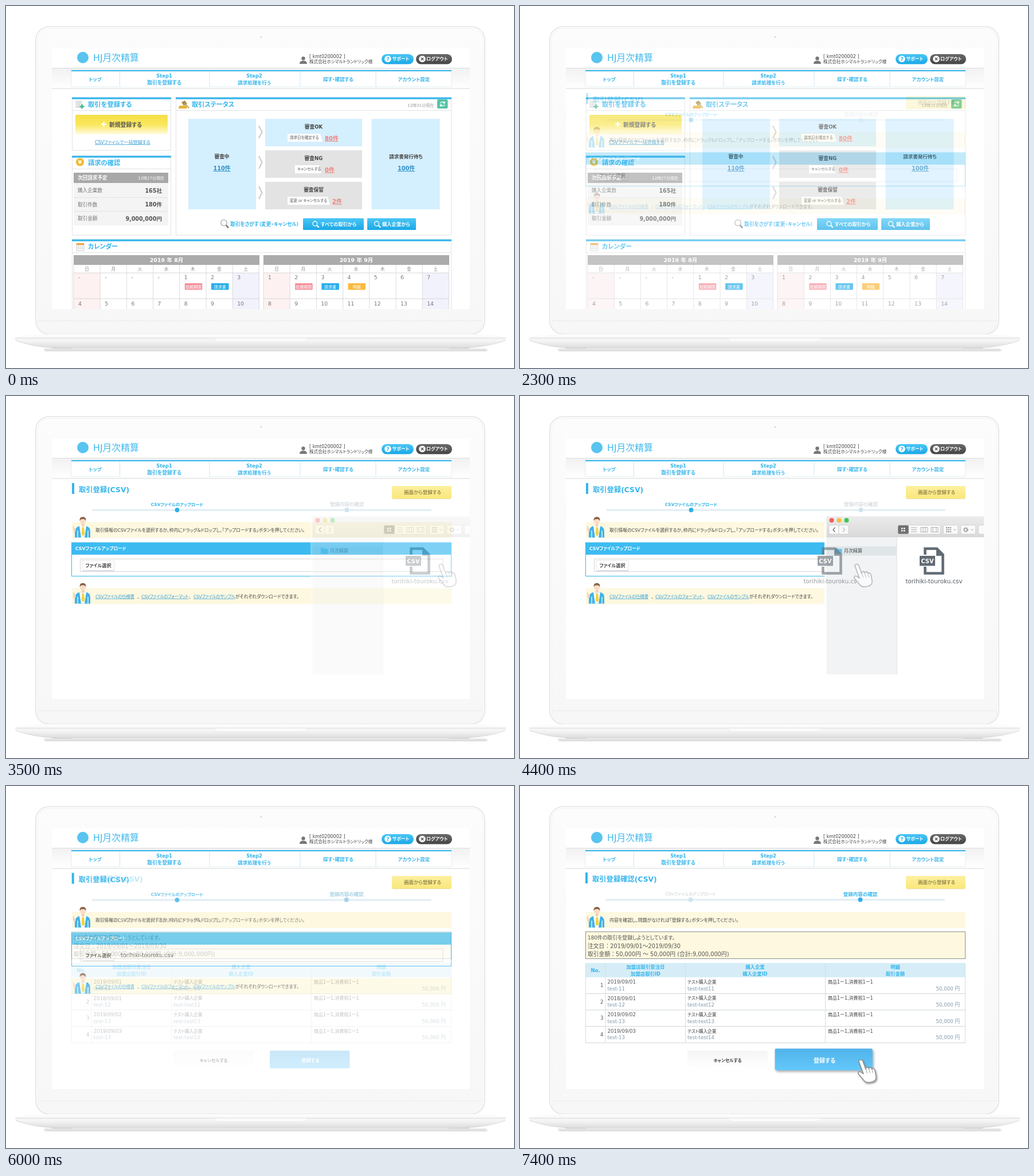
Write an HTML page that moves like this. It is 886 by 632 pixels and loops after 8000 ms.

```html
<!DOCTYPE html>
<html lang="ja">
<head>
<meta charset="utf-8">
<title>取引登録</title>
<style>
html, body { margin: 0; width: 100%; height: 100%; overflow: hidden; background: #fff; }
svg { display: block; width: 886px; height: 632px; }
text { font-family: "DejaVu Sans", "Noto Sans CJK JP", "Noto Sans CJK", sans-serif; font-feature-settings: "palt"; white-space: pre; }
.wide { font-feature-settings: normal; }
</style>
</head>
<body>
<svg id="stage" viewBox="0 0 886 632" xmlns="http://www.w3.org/2000/svg"></svg>
<script>
const BLUE = '#35b5ec', INK = '#444', LINE = '#e2e2e2', PALE = '#d4effe';

// Markup helpers. Text is centred vertically on y.
const attrs = o => Object.entries(o).map(([k, v]) => ` ${k}="${v}"`).join('');
const rect = (x, y, x2, y2, fill, o = {}) =>
  `<rect x="${x}" y="${y}" width="${x2 - x}" height="${y2 - y}" fill="${fill}"${attrs(o)}/>`;
const circle = (x, y, r, fill, o = {}) => `<circle cx="${x}" cy="${y}" r="${r}" fill="${fill}"${attrs(o)}/>`;
const path = (d, fill, o = {}) => `<path d="${d}" fill="${fill}"${attrs(o)}/>`;
const stroke = (d, color, w = 1, o = {}) => path(d, 'none', { stroke: color, 'stroke-width': w, ...o });
const text = (x, y, s, size, fill = INK, o = {}) =>
  `<text x="${x}" y="${y + size * .36}" font-size="${size}" fill="${fill}"${attrs(o)}>${s}</text>`;
const group = (body, o = {}) => `<g${attrs(o)}>${body}</g>`;
const at = (x, y, body) => group(body, { transform: `translate(${x} ${y})` });
const grad = (id, ...stops) => `<linearGradient id="${id}" x2="0" y2="1">` +
  stops.map((c, i) => `<stop offset="${i / (stops.length - 1)}" stop-color="${c}"/>`).join('') + '</linearGradient>';
const times = (n, f) => Array.from({ length: n }, (_, i) => f(i)).join('');

const B = { 'font-weight': 700 }, MID = { 'text-anchor': 'middle' }, END = { 'text-anchor': 'end' };
const BM = { ...B, ...MID }, BE = { ...B, ...END }, UL = { 'text-decoration': 'underline' };
const SHADOW = { filter: 'url(#shadow)' }, WIDE = { class: 'wide' };

const defs = `<defs>
${grad('lid', '#fcfcfc', '#f7f7f7')}${grad('deck', '#fdfdfd', '#f4f4f4', '#dcdcdc')}
${grad('band', '#f1f1f1', '#fff')}${grad('sky', '#49c6f6', '#1ba8e6')}${grad('coal', '#6a6a6a', '#444')}
${grad('sun', '#f6df45', '#fae75c', '#fffbe0')}${grad('gold', '#fdf0a0', '#fae77c')}
${grad('press', '#51b3ea', '#63c8fb')}${grad('mist', '#f5f5f5', '#fff')}${grad('bar', '#ececec', '#d9d9d9')}
<filter id="shadow" x="-20%" y="-30%" width="140%" height="170%"><feDropShadow dx="1.5" dy="2" stdDeviation="1.6" flood-color="#555" flood-opacity=".55"/></filter>
<clipPath id="screen"><rect x="80" y="74" width="729" height="455"/></clipPath></defs>`;

const hand = (x, y) => at(x, y,
  path('M3 7C0 2 6-1 9 4L14 18C14 14 18 13 19 17C20 14 24 14 25 18C26 15 29 17 30 20L32 30C33 36 30 40 20 41C13 42 11 38 8 34L1 26C0 22 4 21 7 24L10 26Z',
    '#fff', { stroke: '#929292', 'stroke-width': 1.6, 'stroke-linejoin': 'round' }) +
  stroke('M14.5 18l2 7M19.5 17.5l2 7M25 18.5l1.5 6', '#aaa', 1.1));

function laptop() {
  return group(rect(66, 598, 838, 601, '#cfcfcf', { rx: 1.5 }), { filter: 'url(#shadow)', opacity: .55 }) +
    rect(52, 36, 835, 573, '#fff', { rx: 23, stroke: '#e3e3e3', 'stroke-width': 1.6 }) +
    rect(55, 39, 832, 572, 'url(#lid)', { rx: 20, stroke: '#f0f0f0' }) +
    stroke('M55 549.5H832', '#ececec') + circle(445, 54, 1.2, '#ccc') +
    path('M72 594h46l-3 4H82zM770 594h44l-8 4H773z', '#cfcfcf') +
    path('M16 578Q34 574 64 573H824Q854 574 872 578V583Q840 595 800 597H88Q48 595 16 584Z', 'url(#deck)') +
    stroke('M16 580H872M17 584Q50 596 88 597H800Q842 595 871 584', '#d3d3d3', .9) +
    path('M363 580H525Q524 586 514 586H374Q364 586 363 580Z', '#fbfbfb', { stroke: '#e5e5e5', 'stroke-width': .6 }) +
    rect(80, 74, 809, 529, '#fff');
}

const step1 = () => rect(198, 112, 355, 141, '#fff') + rect(198, 112, 355, 114, BLUE) +
  text(276, 122, 'Step1', 8.4, BLUE, BM) + text(276, 134, '取引を登録する', 8.8, BLUE, BM);

function header() {
  const tabs = [[155.5, 128, 'トップ'], [433, 134, '請求処理を行う'], [579.5, 128, '探す・確認する'], [711.5, 128, 'アカウント設定']];
  return circle(134, 90, 10, '#58c4ef') +
    text(152, 90, 'HJ月次精算', 15.8, '#3fb9ec') +
    circle(518.5, 91.5, 3.2, '#777') + path('M512 101Q512 95.5 518.5 95.5T525 101Z', '#777') +
    text(529, 88.5, '[ kmt0200002 ]', 8, INK) +
    text(529, 97, '株式会社ホシマルトランドリック様', 7.6, INK) +
    rect(655, 84, 711, 101.5, 'url(#sky)', { rx: 8.7 }) + circle(666, 92.5, 5.8, '#fff') +
    text(666, 92.5, '?', 9.5, BLUE, BM) + text(673.5, 92.5, 'サポート', 8, '#fff', B) +
    rect(715, 84, 778, 101.5, 'url(#coal)', { rx: 8.7 }) + circle(726, 92.5, 5.8, '#fff') +
    stroke('M723.8 90.3l4.4 4.4m0-4.4l-4.4 4.4', '#555', 1.4) + text(733, 92.5, 'ログアウト', 8, '#fff', B) +
    rect(80, 108, 809, 144, 'url(#band)') + stroke('M80 108.5H809', '#dcdcdc') + stroke('M80 144H809', '#d8d8d8', 1.2) +
    rect(114, 112, 777, 141, '#fff', { stroke: '#d9eaf3', 'stroke-width': .8 }) + step1() +
    rect(114, 112, 777, 114, BLUE) + stroke('M198.5 114V141M355 114V141M513 114V141M645 114V141', '#cfe6f1') +
    text(433, 122, 'Step2', 8.4, BLUE, BM) + tabs.map(([x, y, s]) => text(x, y, s, 8.5, BLUE, BM)).join('');
}

const panel = (x, y, x2, y2, title, tx, o) => rect(x + .5, y, x2 - .5, y2, '#fff', { stroke: LINE }) +
  rect(x, y - .5, x2, y + 2.7, BLUE) + stroke(`M${x} ${y + 22.5}H${x2}`, LINE) +
  text(tx, y + 12, title, 11.3, BLUE, { ...B, ...o });
const lens = (x, y, r, c) => stroke(`M${x + r * .7} ${y + r * .7}l4 4`, c, 2) + circle(x, y, r, 'none', { stroke: c, 'stroke-width': 1.3 });

function month(x, title, first, tags) {
  const w = 46.2, X = i => x + i * w;
  return rect(x, 435, x + 324, 452, '#ababab') + text(x + 162, 444, title, 9.5, '#fff', BM) +
    rect(x, 466, X(1), 529, '#fdf2f1') + rect(X(6), 466, x + 324, 529, '#f2f2fd') +
    times(8, i => stroke(`M${X(i)} 452V529`, '#d9d9d9', .9)) +
    stroke(`M${x} 466H${x + 324}M${x} 511H${x + 324}`, '#d3d3d3', .9) +
    times(7, i => text(X(i) + 23, 459.5, '日月火水木金土'[i], 7.5, '#888', MID) +
      text(X(i) + 8, 474, first + i > 0 ? first + i : '-', 9.3, '#777') +
      text(X(i) + 8, 519.5, first + i + 7, 9.3, '#777')) +
    tags.map(([i, s, c]) => rect(X(i) + 9, 484, X(i) + 39.5, 495.5, c, { rx: 1 }) +
      text(X(i) + 24.2, 490, s, 7, '#fff', MID)).join('');
}

function dashboard() {
  const rows = [['購入企業数', '165社', 322], ['取引件数', '180件', 346.5], ['取引金額', '9,000,000円', 371]];
  const cases = [['審査OK', '請求日を確定する', '80件', 491, 552, 556], ['審査NG', 'キャンセルする', '0件', 504, 550, 556],
    ['審査保留', '変更 or キャンセルする', '2件', 491, 565, 569]];
  return rect(80, 145, 809, 529, '#fff') +
    panel(115, 160, 288, 252, '取引を登録する', 143) +
    rect(122, 166, 132, 177, '#eef2f3', { stroke: '#b8c4c8', 'stroke-width': .8 }) + stroke('M124 169h6m-6 3h6m-6 3h4', '#b5c0c4', .9) +
    stroke('M132.5 171.5v8m-4-4h8', '#3fb78a', 2.3) +
    rect(121, 190, 282, 224, 'url(#sun)', { rx: 2 }) + stroke('M166 206.5h9m-4.5-4.5v9', '#fff', 2.4) +
    text(180, 207, '新規登録する', 9.8, '#555', B) +
    text(155, 237.5, 'CSVファイルで一括登録する', 8.4, '#3a9fd6', { ...UL, 'letter-spacing': -.4 }) +
    panel(115, 262, 288, 400, '請求の確認', 143) +
    circle(129, 272.5, 7, '#f2b82e') + text(129, 272.5, '¥', 9, '#fff', BM) +
    rect(118, 309, 283, 383, '#f4f4f4') + rect(118, 291, 283, 309, '#a8a8a8') +
    text(125, 300, '次回請求予定', 8.6, '#fff', B) + text(276, 300.5, '12時27分現在', 7, '#fff', END) +
    rows.map(([a, b, y]) => text(125, y, a, 8.6, '#777') + text(272, y + .5, b, 9.6, '#555', BE)).join('') +
    stroke('M118 334.5H283M118 358.5H283', '#ccc', .8, { 'stroke-dasharray': '2 1.5' }) +

    panel(296, 160, 777, 400, '取引ステータス', 324, { 'letter-spacing': -.2 }) +
    path('M302 174h12l2 5H301z', '#e6b23a') + path('M306 168l6-3 4 6-6 3z', '#a98a4c') + stroke('M311 170l8 8', '#c9a04a', 2) +
    text(746, 173, '12時31分現在', 7, '#999', END) + rect(752, 163, 770.5, 179, '#55c3a5', { rx: 2.5 }) +
    stroke('M757.5 170a4 4 0 0 1 7-1m.5-2.5v3h-3M765 172a4 4 0 0 1-7 1m-.5 2.5v-3h3', '#fff', 1.4) +
    rect(318, 197, 436, 355, PALE) + rect(637.5, 197, 756.5, 355, PALE) +
    text(376.5, 263, '審査中', 8.7, INK, BM) + text(376.5, 283.5, '110件', 9.8, '#2f8fc8', { ...BM, ...UL }) +
    text(697.5, 263, '請求書発行待ち', 8.5, INK, BM) + text(698, 283.5, '100件', 9.8, '#2f8fc8', { ...BM, ...UL }) +
    cases.map(([name, act, n, x, x2, nx], i) => at(0, i * 55,
      rect(452, 197, 621, 245, i ? '#e3e3e3' : PALE) +
      stroke(`M441 ${209 - i * 2}l5.5 11-5.5 11`, '#cfcfcf', 2.4) +
      text(536.5, 211, name, 8.7, INK, BM) + path(`M${x} 223H${x2 - 4}L${x2} 237H${x}Z`, '#fff') +
      text(x + 4, 230, act, 6.7, '#555', { 'letter-spacing': -.15 }) + text(nx, 231, n, 10, '#f0827c', { ...B, ...UL }))).join('') +
    lens(380, 378.5, 5.2, '#aaa') + stroke('M384 383l4 4.5', '#777', 2.4) +
    text(391, 381, '取引をさがす（変更・キャンセル）', 8.7, BLUE, B) +
    rect(518, 370.5, 624, 391, 'url(#sky)', { rx: 1.5 }) + lens(539, 380, 4, '#fff') + text(549, 381, 'すべての取引から', 8.3, '#fff', B) +
    rect(630, 370.5, 715, 391, 'url(#sky)', { rx: 1.5 }) + lens(646.5, 380, 4, '#fff') + text(656, 381, '購入企業から', 8.3, '#fff', B) +

    panel(115, 408, 777, 540, 'カレンダー', 143, { 'letter-spacing': -.3 }) +
    rect(123, 415, 136, 427, '#fff', { stroke: '#bbb', 'stroke-width': .8 }) + rect(123, 414, 136, 417.5, '#f0a54a') +
    stroke('M125 420.5h9m-9 3h9', '#bbb', 1.4, { 'stroke-dasharray': '2 1.5' }) +
    month(118, '2019 年 8月', -3, [[4, '依頼期限', '#f4919c'], [5, '請求書', '#27aeea']]) +
    month(449, '2019 年 9月', 1, [[1, '依頼期限', '#f4919c'], [2, '請求書', '#27aeea'], [3, '明細', '#f8b93f']]);
}

const guide = y => rect(115, y, 777, y + 28, '#fdf8df') + at(117, y - 9,
  path('M3 36V26Q4 17 12 16H22Q30 17 30 26V36Z', '#3fb2e8') + path('M11 16h12l-3 20H14Z', '#fff') +
  path('M15.5 18h3.5l1.5 12-3 4-3-4z', '#f3d348') + stroke('M8 24v12M26 24v12', '#fff', 1.2) +
  rect(15, 11, 19.5, 17, '#f6cfb4') + circle(17, 7.5, 5, '#fadcc6') + path('M11.5 7Q11 0 17 0T22.5 7Q20 3 16 4Q13 4 11.5 7Z', '#8a6248') +
  path('M0 22Q-1 17 1 15L2.5 20L5 21L4 26H1Z', '#f8d3ba'));

function steps(dx, active) {
  const label = (x, s, on, size) => text(x, 189, s, size, on ? BLUE : '#c5cdd2', on ? BM : MID) +
    circle(x, 199, 3.9, on ? '#2fb0e8' : '#cfe3ee');
  return at(dx, dx / 2, rect(150, 197.5, 742, 200.8, '#e2eef5', { rx: 1.5 }) +
    label(298.5, 'CSVファイルのアップロード', active === 0, 7.4) + label(594.5, '登録内容の確認', active === 1, 8.5));
}

const pageTop = (dx, title) => rect(80, 145, 809, 529, '#fff') + rect(115 + dx, 152 + dx, 119 + dx, 171 + dx, BLUE) +
  text(127 + dx, 163.5 + dx, title, 12.3, BLUE, B) +
  rect(673, 157, 777, 179, 'url(#gold)', { rx: 2 }) + stroke('M674 179.5H776', '#ecdfa4') +
  text(726.5, 167.5, '画面から登録する', 8.5, '#6d602c', MID);

function upload() {
  const link = (x, s) => text(x, 350, s, 7.6, '#3a9fd6', { ...UL, 'letter-spacing': -.35 });
  return pageTop(0, '取引登録(CSV)') + steps(0, 0) + guide(220) +
    text(156, 234.5, '取引情報のCSVファイルを選択するか、枠内にドラッグ&amp;ドロップし、「アップロードする」ボタンを押してください。', 7.75, INK, { 'font-weight': 500 }) +
    rect(114.5, 256, 776.5, 314.5, '#fff', { stroke: BLUE }) + rect(114, 256, 777, 277, '#3dbbf1') +
    text(121, 266, 'CSVファイルアップロード', 7.8, '#fff', B) +
    rect(129.5, 284.5, 762, 306.5, '#fff', { stroke: '#d6d6d6' }) +
    rect(133, 287, 189, 304.5, '#fff', { rx: 2, stroke: '#e2e2e2' }) + stroke('M134 305H189', '#ccc') +
    text(161, 296.5, 'ファイル選択', 8.1, INK, BM) +
    guide(335.5) + link(156, 'CSVファイルの仕様書') + link(236, 'CSVファイルのフォーマット') + link(327, 'CSVファイルのサンプル') +
    text(229, 350, '、', 8) + text(319, 350, '、', 8) + text(400, 350.5, 'がそれぞれダウンロードできます。', 7.75, INK, { 'font-weight': 500 });
}

const csvFile = () => stroke('M706.5 277V266.5H727L737.5 277V309.5H706.5V298', '#626b74', 4.6) +
  path('M726 265L740 279H726Z', '#626b74') + rect(697, 279, 724, 296.5, '#626b74') +
  text(710.5, 288, 'CSV', 9.8, '#fff', BM) + text(722, 323.5, 'torihiki-touroku.csv', 10.3, '#555c63', MID);

function finder() {
  const key = (x, x2, fill = '#fafafa') => rect(x, 225.5, x2, 241, fill, { rx: 2.5, stroke: '#cfcfcf', 'stroke-width': .8 });
  return rect(531, 246, 809, 486, '#fff') + rect(534.5, 246, 657, 486, '#f1f3f5') + stroke('M657 246V486', '#dedede') +
    rect(531, 210, 534.5, 246, '#fff') + rect(534.5, 210, 809, 246, 'url(#bar)') + stroke('M534.5 246H809', '#ccc', .8) +
    ['#f2605c', '#f6be3c', '#3fc653'].map((c, i) => circle(543.5 + i * 13, 217, 4, c)).join('') +
    key(539, 556) + key(556, 573) + stroke('M549.5 229.5l-3.5 4 3.5 4', '#666', 1.2) + stroke('M563 229.5l3.5 4-3.5 4', '#bbb', 1.2) +
    key(659, 733) + key(659, 678, '#707070') + key(738.5, 764) + key(769, 794.5) + key(799.5, 815) +
    times(4, i => rect(665 + i % 2 * 4, 230 + (i >> 1) * 4, 667.5 + i % 2 * 4, 232.5 + (i >> 1) * 4, '#fff')) +
    stroke('M682 230h10m-10 3.5h10m-10 3.5h10', '#aaa') +
    stroke('M699 229.5h12v8h-12zm4 0v8m4-8v8M717 229.5h12v8h-12zm3 0v8m6-8v8', '#aaa', .9) +
    stroke('M743 230h9m-9 3.5h9m-9 3.5h9', '#999', 2, { 'stroke-dasharray': '2.5 1' }) +
    circle(777.5, 233.5, 3, 'none', { stroke: '#8b8b8b', 'stroke-width': 2.4, 'stroke-dasharray': '1.6 .8' }) +
    stroke('M756.5 232.5l2 2 2-2M786.5 232.5l2 2 2-2', '#999') +
    rect(534.5, 262.5, 657, 278.5, '#dfe6e8') + path('M549 265.5h4.5l1.5 1.5h6.5v8.5H549z', '#6cbfe6') +
    text(565, 270.5, '月次精算', 8, INK) + csvFile();
}

const sendButton = () => rect(460, 462, 599.5, 493, 'url(#press)', { rx: 2 }) + text(531, 479, '登録する', 8.2, '#fff', BM);

function confirmPage() {
  const cols = [[219, '加盟店取引受注日', '加盟店取引ID'], [410, '購入企業', '購入企業ID'], [654.5, '明細', '取引金額']];
  const rows = [['2019/09/01', 11, 11], ['2018/09/01', 12, 12], ['2019/09/02', 13, 13], ['2019/09/03', 13, 14]];
  const SOFT = '#8199a8';
  return pageTop(-1, '取引登録確認(CSV)') + steps(-1, 1) + guide(220) +
    text(156, 234.5, '内容を確認し、問題がなければ「登録する」ボタンを押してください。', 7.95, INK, { 'font-weight': 500 }) +
    rect(114.5, 254.5, 776.5, 301.5, '#fdf8df', { stroke: '#8f8f88' }) +
    text(118, 265, '180件の取引を登録しようとしています。', 8.9, '#555') +
    text(118, 279, '注文日：2019/09/01～2019/09/30', 9.8, '#555', WIDE) +
    text(118, 293, '取引金額：50,000円 ～ 50,000円 (合計:9,000,000円)', 9.8, '#555', WIDE) +
    rect(114.5, 309, 776.5, 334, '#d6edf7') + text(131.5, 321.5, 'No.', 8.5, BLUE, BM) +
    cols.map(([x, a, b]) => text(x, 316, a, 8.4, BLUE, BM) + text(x, 327.5, b, 8.4, BLUE, BM)).join('') +
    stroke('M114.5 309V448M149 309V448M288.5 309V448M532.5 309V448M776.5 309V448', '#d3dde2') +
    rows.map(([date, id, co], i) => at(0, i * 28.6,
      stroke('M114 362.5H777', '#cfd6da') + text(145.5, 348, i + 1, 8.6, '#555', END) +
      text(152.5, 342, date, 8.6, '#555') + text(152.5, 353.5, 'test-' + id, 8.6, SOFT) +
      text(292, 342, 'テスト購入企業', 7.9, INK, { 'letter-spacing': -.2 }) + text(292, 353.5, 'test-test' + co, 8.6, SOFT) +
      text(537, 342, '商品1ー1,消費税1ー1', 8, INK) + text(767, 353.5, '50,000 円', 8.6, SOFT, END))).join('') +
    rect(292, 462, 432, 493, 'url(#mist)', { rx: 2 }) + text(362, 479, 'キャンセルする', 7.6, INK, BM) + sendButton();
}

const layers = {
  dash: dashboard(), csv: upload(), name: text(200, 296, 'torihiki-touroku.csv', 9.6, '#555'),
  win: finder(), grab: hand(753, 292), ghost: csvFile() + hand(760, 292), done: confirmPage(),
  menu: group(step1(), SHADOW), menuHand: group(hand(352, 130), SHADOW),
  send: group(sendButton(), SHADOW), sendHand: group(hand(589, 476.5), SHADOW)
};
document.getElementById('stage').innerHTML = defs + rect(0, 0, 886, 632, '#fff') + laptop() +
  group(header() + Object.entries(layers).map(([id, body]) => group(body, { id })).join(''), { 'clip-path': 'url(#screen)' });
const el = Object.fromEntries(Object.keys(layers).map(id => [id, document.getElementById(id)]));

const clamp = v => Math.max(0, Math.min(1, v));
const show = (id, a) => {
  el[id].setAttribute('opacity', a);
  el[id].style.display = a > 0 ? '' : 'none';
};
const zoom = (id, x, y, s) => el[id].setAttribute('transform', `translate(${x} ${y}) scale(${s}) translate(${-x} ${-y})`);

// The picture advances in ticks of 100 ms.
function draw(ms) {
  const t = Math.floor(ms / 100) * 100;
  const ramp = (start, n) => clamp(((t - start) / 100 + 1) / n);
  const fade = (start, a) => t < start ? 0 : t < start + 100 ? a : 1;

  show('csv', fade(2300, .3));
  show('done', fade(6000, .3));

  const close = fade(4900, .5), open = ramp(3500, 3) * (1 - close), drag = t >= 4200;
  show('win', open);
  show('grab', drag ? 0 : open);
  show('ghost', drag ? .6 * (1 - close) : 0);
  el.ghost.setAttribute('transform', `translate(${Math.max(-350, -356 * ramp(4200, 6))} 0)`);
  show('name', close);

  const menu = t < 2300 ? ramp(1000, 4) : 0, send = ramp(7100, 4);
  show('menu', menu > 0 ? 1 : 0);
  show('menuHand', menu);
  zoom('menu', 276.5, 127, 1 + .35 * menu);
  show('send', send > 0 ? 1 : 0);
  show('sendHand', send);
  zoom('send', 530, 478, 1 + .22 * send);
}

const start = performance.now();
function tick() {
  draw((performance.now() - start) % 8000);
  requestAnimationFrame(tick);
}
draw(0);
tick();
</script>
</body>
</html>
```
